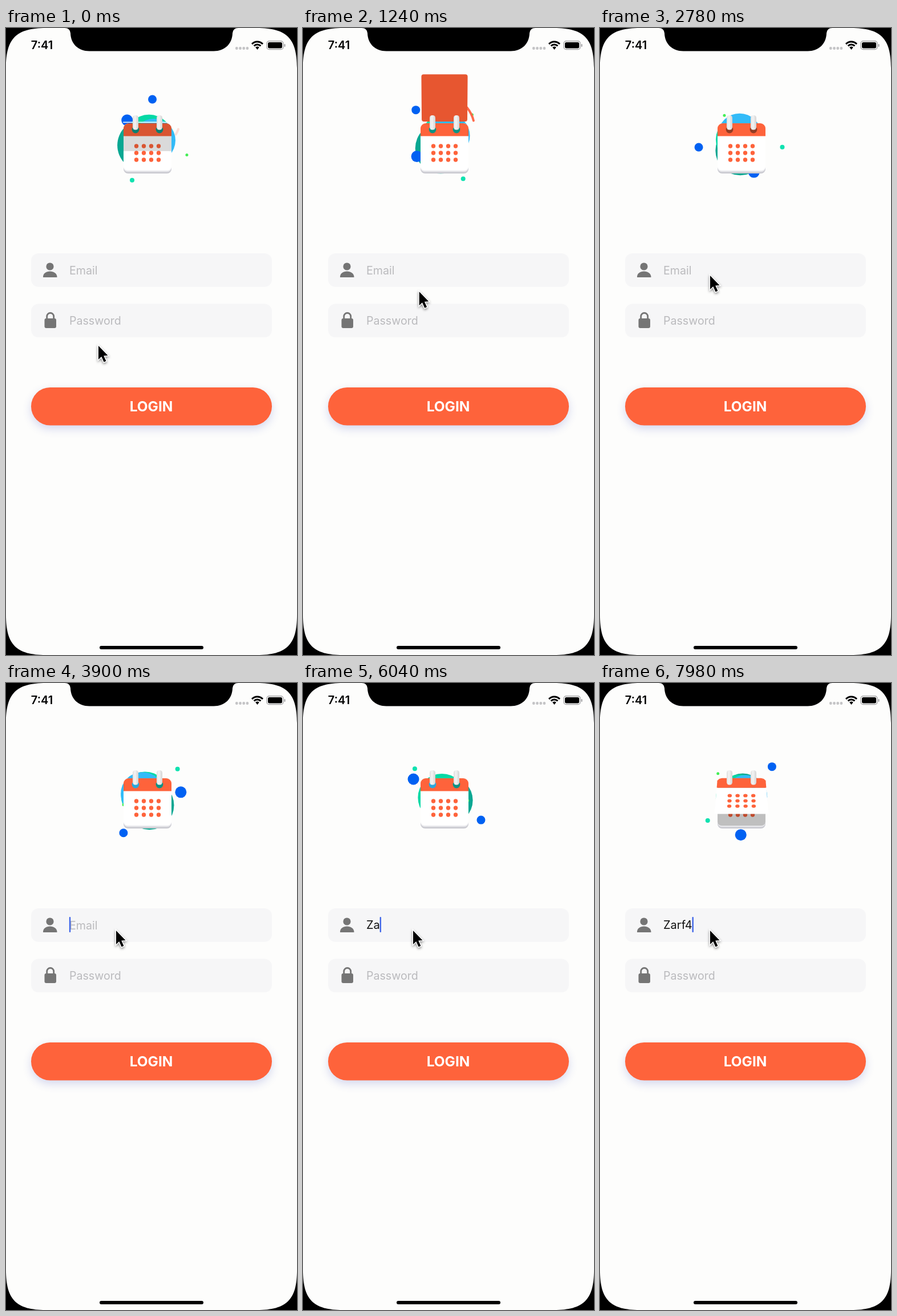
These frames come from a looping animation (510 px wide and 1099 px high, 8000 ms). An HTML page with a canvas:

```html
<!DOCTYPE html>
<html lang="en">
<head>
<meta charset="utf-8">
<title>Login screen</title>
<style>
html, body { margin: 0; width: 100%; height: 100%; overflow: hidden; background: #fdfdfc; }
canvas { display: block; }
</style>
</head>
<body>
<canvas id="stage" width="510" height="1099"></canvas>
<script>
const c = document.getElementById('stage').getContext('2d');
const W = 510, H = 1099, LOOP = 8000;
const FONT = 'Inter, "Open Sans", sans-serif';
const ORANGE = '#fe633b', BLUE = '#0061f2', GRAY = '#757575', HINT = '#bababd';
const USER = 'Zarf4';
const FOCUS_AT = 78, TYPE_AT = 118, TYPE_STEP = 10.5;

// Small dots orbit the calendar; angles in degrees, counter-clockwise, n in ticks
const DOTS = [
  { r: 7.5, color: BLUE, angle: n => 83.5 + 1.88 * n, dist: () => 75.5 },
  { r: 10, color: BLUE, angle: n => 133 + 2.9 * n, dist: n => 52.5 + 0.08 * n },
  { r: 4, color: '#10e2b0', angle: n => 248 + 1.91 * n, dist: () => 72 },
  { r: 2.5, color: '#44ee55', angle: n => -18 + 2.35 * n + 0.0038 * n * n, dist: n => 55.5 + 17 * Math.cos(n / 35) }
];

// Large discs circle slightly off centre behind the calendar
const DISCS = [
  { r: n => 45 - 0.025 * n, color: '#08a792', x: 248, y: 207, angle: n => 170 + 1.55 * n, dist: () => 8 },
  { r: () => 42, color: '#04d9a5', x: 247, y: 202, angle: n => 66 + 0.75 * n, dist: n => 9 - 0.04 * n },
  { r: () => 38, color: '#33bbf8', x: 248, y: 197, angle: n => 2 * n, dist: n => 11 - 0.02 * n }
];

const lerp = (a, b, k) => a + (b - a) * k;
const clamp01 = v => Math.max(0, Math.min(1, v));
const easeInOut = t => t < 0.5 ? 2 * t * t : 1 - 2 * (1 - t) * (1 - t);
const radians = deg => deg * Math.PI / 180;

function keyed(n, times, values) {
  const i = times.findIndex(t => n <= t);
  if (i === 0) return values[0];
  if (i < 0) return values[values.length - 1];
  return lerp(values[i - 1], values[i], (n - times[i - 1]) / (times[i] - times[i - 1]));
}

// Pictures are held for 20, 100 and 20 ms in turn
function tickAt(ms) {
  const r = ms % 140;
  return Math.floor(ms / 140) * 3 + (r < 20 ? 0 : r < 120 ? 1 : 2);
}

function circle(x, y, r, color) {
  c.fillStyle = color;
  c.beginPath();
  c.arc(x, y, r, 0, Math.PI * 2);
  c.fill();
}

function orbit(x, y, deg, dist, r, color) {
  const a = radians(deg);
  circle(x + Math.cos(a) * dist, y - Math.sin(a) * dist, r, color);
}

function box(x, y, w, h, r, color) {
  c.fillStyle = color;
  c.beginPath();
  c.roundRect(x, y, w, h, r);
  c.fill();
}

function poly(points, color) {
  c.fillStyle = color;
  c.beginPath();
  points.forEach(([x, y]) => c.lineTo(x, y));
  c.closePath();
  c.fill();
}

function text(str, x, y, size, weight, color, align = 'left') {
  c.font = `${weight} ${size}px ${FONT}`;
  c.textAlign = align;
  c.fillStyle = color;
  c.fillText(str, x, y);
}

function drawBezel() {
  c.fillStyle = '#000';
  for (const [sx, sy] of [[1, 1], [-1, 1], [1, -1], [-1, -1]]) {
    c.save();
    c.translate(sx < 0 ? W : 0, sy < 0 ? H : 0);
    c.scale(sx, sy);
    c.beginPath();
    c.moveTo(0, 0);
    c.lineTo(0, 70);
    c.bezierCurveTo(0, 18, 18, 0, 70, 0);
    c.fill();
    c.restore();
  }
  c.beginPath();
  c.moveTo(103, 0);
  c.quadraticCurveTo(112, 0, 113, 9);
  c.bezierCurveTo(113.5, 28, 127, 40.5, 146, 40.5);
  c.lineTo(364, 40.5);
  c.bezierCurveTo(383, 40.5, 396.5, 28, 397, 9);
  c.quadraticCurveTo(398, 0, 407, 0);
  c.fill();
  box(164, 1083, 182, 6, 3, '#000');
}

function drawStatus() {
  text('7:41', 43.8, 37.3, 20, 600, '#000');
  for (let i = 0; i < 4; i++) box(402 + i * 6.2, 33, 4.6, 5, 2, '#c4c4c6');
  const from = -Math.PI * 0.76, to = -Math.PI * 0.24;
  c.strokeStyle = '#000';
  c.lineWidth = 3;
  for (const r of [13, 8]) {
    c.beginPath();
    c.arc(440.5, 37, r, from, to);
    c.stroke();
  }
  c.fillStyle = '#000';
  c.beginPath();
  c.moveTo(440.5, 38);
  c.arc(440.5, 37, 4.6, from, to);
  c.fill();
  c.strokeStyle = '#a2a2a4';
  c.lineWidth = 1.3;
  c.beginPath();
  c.roundRect(457, 23, 29, 14.5, 4);
  c.stroke();
  box(459, 25, 25, 10.5, 2.5, '#000');
  box(487.5, 28, 2, 5, 1, '#a2a2a4');
}

function drawIcons() {
  circle(77, 418, 6.6, GRAY);
  c.beginPath();
  c.moveTo(65, 437);
  c.bezierCurveTo(64, 423, 90, 423, 89.5, 437);
  c.fill();
  box(67.5, 509, 20.5, 17, 3, GRAY);
  c.strokeStyle = GRAY;
  c.lineWidth = 2.8;
  c.beginPath();
  c.moveTo(71.7, 511);
  c.arc(77.7, 505.5, 6, Math.PI, 0);
  c.lineTo(83.7, 511);
  c.stroke();
}

function drawForm(n) {
  for (const y of [395, 483.5]) box(44, y, 422, 58.7, 13, '#f6f6f7');
  drawIcons();

  const count = Math.max(0, Math.floor((n - TYPE_AT) / TYPE_STEP) + 1);
  const typed = USER.slice(0, count);
  text('Password', 111, 520, 19.6, 400, HINT);
  if (typed) text(typed, 111, 430.5, 20, 400, '#111');
  else text('Email', 111, 432, 19.6, 400, HINT);
  if (n >= FOCUS_AT) box(110.8 + c.measureText(typed).width, 410, 2.4, 27, 1, '#4167e8');

  c.save();
  c.shadowColor = 'rgba(70, 80, 190, 0.22)';
  c.shadowBlur = 16;
  c.shadowOffsetY = 6;
  box(44, 630, 422, 66.5, 33.2, ORANGE);
  c.restore();
  text('LOGIN', 254.5, 672.3, 24.4, 700, '#fff', 'center');
}

function drawArc(n) {
  const alpha = clamp01(0.2 + 0.08 * n) * clamp01((36 - n) / 10);
  if (alpha === 0) return;
  const a = radians(19 + 1.07 * n), dist = Math.min(68, 55 + 0.9 * n);
  const half = Math.min(0.22, 0.09 + 0.0095 * n);
  c.save();
  c.globalAlpha = alpha;
  c.translate(248 + Math.cos(a) * dist, 200 - Math.sin(a) * dist);
  c.rotate(0.45 - 0.035 * n);
  c.strokeStyle = '#ff6a4a';
  c.lineWidth = 4;
  c.lineCap = 'round';
  c.beginPath();
  c.arc(-58, 0, 58, -half, half);
  c.stroke();
  c.restore();
}

function drawOrbit(n) {
  // The spin hesitates briefly before catching up
  const t = keyed(n, [0, 37, 59, 103, 171], [0, 36.5, 55, 103, 171]);
  for (const d of DISCS) orbit(d.x, d.y, d.angle(t), d.dist(t), d.r(t), d.color);
  for (const d of DOTS) orbit(248, 200, d.angle(t), d.dist(t), d.r, d.color);
  drawArc(n);
}

function dateDots(place, squash) {
  c.fillStyle = ORANGE;
  for (let row = 0; row < 3; row++) {
    for (let col = 0; col < 4; col++) {
      const [x, y] = place(228.5 + col * 13, 207 + row * 12);
      c.beginPath();
      c.ellipse(x, y, 3.7, 3.7 * squash, 0, 0, Math.PI * 2);
      c.fill();
    }
  }
}

function drawBody(n) {
  box(206, 200, 84, 55, 8, '#c9c9d0');
  box(206, 200, 84, 52.5, 8, '#e6e6ea');
  box(206, 167, 84, 83, [9, 9, 7, 7], '#fff');
  box(206, 167, 84, 22.5, [9, 9, 0, 0], ORANGE);
  dateDots((x, y) => [x, y], 1);
  const [left, right] = n < 48 ? ['#0d9384', '#0d9384']
    : n < 75 ? ['#923d24', '#923d24'] : ['#2ba7dc', '#0d9084'];
  circle(227, 178, 6.4, left);
  circle(269, 178, 6.4, right);
}

// 0 lies flat, 90 is edge-on, 180 points up, 270 is gone behind
function pageAngle(n) {
  if (n < 51) return 90 + 180 * easeInOut(n / 51);
  return 40 * clamp01((n - 163) / 8) ** 2;
}

function drawPage(angle) {
  const rad = radians(angle), hinge = 166;
  const place = (x, y) => {
    const down = y - hinge;
    return [248 + (x - 248) * 470 / (470 - down * Math.sin(rad)), hinge + down * Math.cos(rad)];
  };

  const cover = clamp01((110 - angle) / 34);
  const foot = cover === 1 ? 7 : 0;
  box(206, 167, 84, 83 * cover, [9, 9, foot, foot], `rgba(0,0,0,${0.25 * cover * clamp01(angle / 15)})`);

  if (Math.abs(angle - 90) < 1) {
    box(205, 164.5, 88, 1.6, 0.8, '#fff');
  } else if (angle < 90) {
    poly([[206, 189], [290, 189], [290, 249], [206, 249]].map(p => place(...p)), '#fff');
    poly([[206, 173], [209, 168.5], [214, 167], [282, 167], [287, 168.5], [290, 173], [290, 189], [206, 189]]
      .map(p => place(...p)), ORANGE);
    dateDots(place, Math.cos(rad));
  } else {
    const k = clamp01((angle - 150) / 90);
    const color = `rgb(${lerp(255, 191, k)},${lerp(98, 67, k)},${lerp(57, 32, k)})`;
    const [left, top] = place(207, 251), bottom = 164;
    const inset = Math.min(4, Math.max(0, bottom - top) / 2);
    c.lineJoin = 'round';
    c.lineWidth = inset * 2;
    c.strokeStyle = color;
    poly([[left + inset, top + inset], [496 - left - inset, top + inset],
      [288 - inset, bottom - inset], [208 + inset, bottom - inset]], color);
    if (inset > 0) c.stroke();
  }
}

function drawRings() {
  for (const x of [227, 269]) {
    const g = c.createLinearGradient(x - 5, 0, x + 5, 0);
    g.addColorStop(0, '#dedede');
    g.addColorStop(0.4, '#f4f4f4');
    g.addColorStop(1, '#d4d4d4');
    box(x - 5, 153, 10, 25.5, 4.5, g);
  }
}

function drawCalendar(n) {
  const angle = pageAngle(n);
  drawOrbit(n);
  drawBody(n);
  if (angle > 0) drawPage(angle);
  drawRings();
}

function drawPointer(n) {
  const times = [0, 14, 37, 46];
  const arrow = [[0, 0], [0, 24], [5.3, 19], [9.6, 28.5], [13.4, 26.8], [9.2, 17.5], [16.5, 17]];
  c.save();
  c.translate(keyed(n, times, [162, 211, 197, 193]), keyed(n, times, [557, 482, 444, 434]));
  c.shadowColor = 'rgba(0,0,0,0.35)';
  c.shadowBlur = 4;
  c.shadowOffsetY = 2;
  c.lineJoin = 'miter';
  c.lineWidth = 3;
  c.strokeStyle = '#fff';
  poly(arrow, '#000');
  c.stroke();
  c.shadowColor = 'transparent';
  poly(arrow, '#000');
  c.restore();
}

function draw(ms) {
  const n = tickAt(ms % LOOP);
  c.fillStyle = '#fdfdfc';
  c.fillRect(0, 0, W, H);
  drawBezel();
  drawStatus();
  drawForm(n);
  drawCalendar(n);
  drawPointer(n);
}

const start = performance.now();
function frame() {
  draw(performance.now() - start);
  requestAnimationFrame(frame);
}
frame();
</script>
</body>
</html>
```
